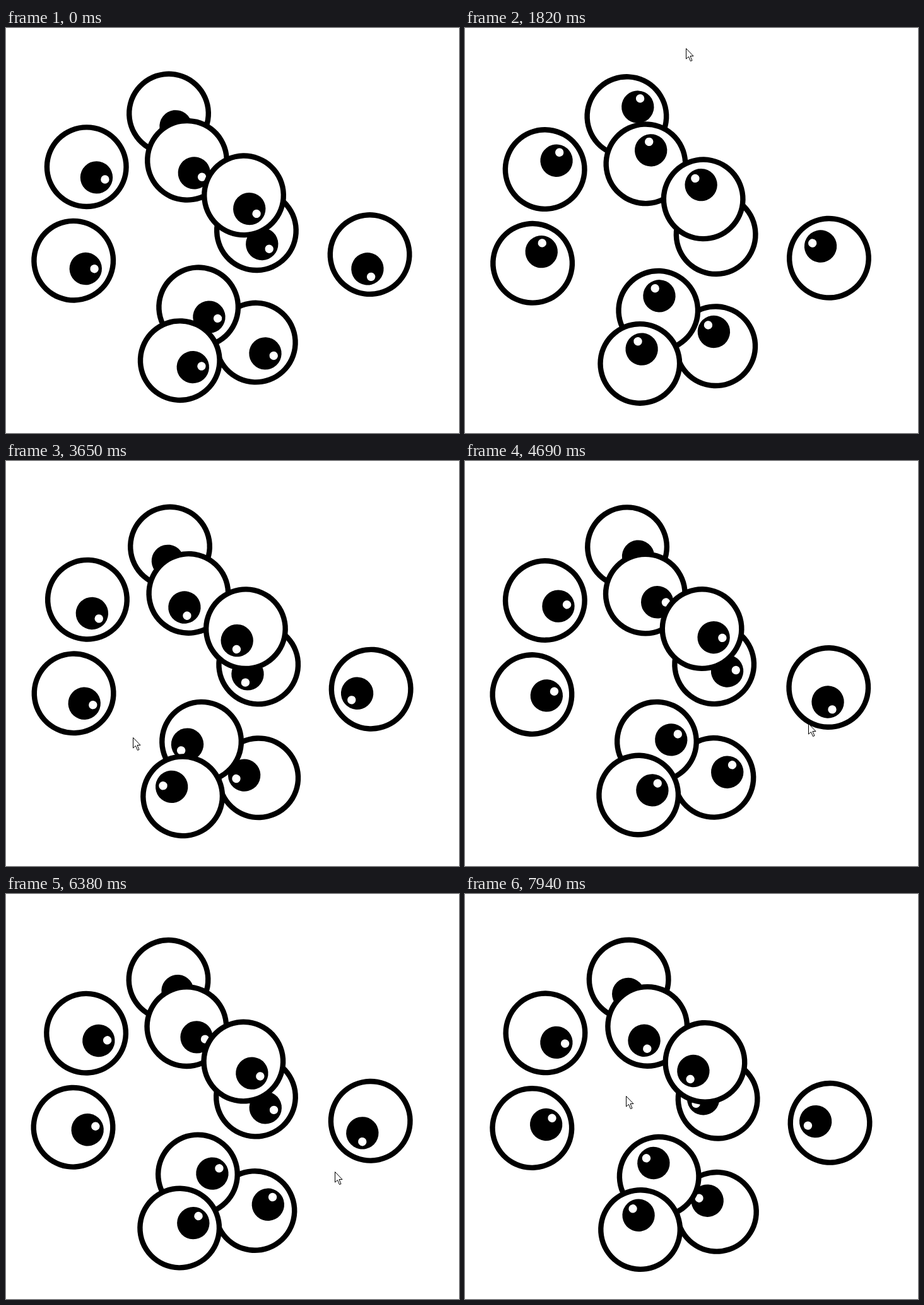
Write an HTML page with a canvas that moves like this. It is 718 px wide and 642 px high and loops after 8000 ms.

```html
<!DOCTYPE html>
<html lang="en">
<head>
<meta charset="utf-8">
<title>Googly eyes</title>
<style>
  html, body { margin: 0; width: 100%; height: 100%; overflow: hidden; background: #fff; }
  canvas { display: block; }
</style>
</head>
<body>
<canvas id="stage" width="718" height="642"></canvas>
<script>
const ctx = document.getElementById('stage').getContext('2d');
const LOOP = 8000, STEP = 130.2;
const GAZE_LEAD = 0.42;    // in steps: the eyes react slightly before the drawn pointer
const HALF_BOX = 58;       // half the side of an eye's rotating box
const TILT = -2 * Math.PI / 180;

// Eye centres, back to front
const eyes = [
  [259, 138.5], [288, 212.7], [397.6, 324.2], [377.7, 268.3], [397.4, 501.2],
  [307, 444.8], [278.2, 529], [109.4, 370.8], [129.4, 222.7], [575.6, 362]
];

// Turning points of the pointer: step, x, y
const path = [
  [0, 500, 685], [4, 652, 300], [7, 595, 132], [14, 350, 32], [20, 167, 56],
  [25, 4, 330], [28, 201, 438], [31, 80, 540], [37, 600, 400], [43, 492, 425],
  [47, 650, 470], [50, 460, 425], [54, 449, 412], [61, 255, 320], [62, 240, 335]
];

function slope(i, axis) {
  const a = path[Math.max(i - 1, 0)], b = path[Math.min(i + 1, path.length - 1)];
  return (b[axis] - a[axis]) / (b[0] - a[0]);
}

// Smooth curve through the turning points
function pointerAt(step) {
  const i = path.findLastIndex(point => point[0] <= step);
  const a = path[i], b = path[i + 1], span = b[0] - a[0], u = (step - a[0]) / span;
  return [1, 2].map(axis =>
    a[axis] + (b[axis] - a[axis]) * u * u * (3 - 2 * u) +
    span * u * (1 - u) * (slope(i, axis) * (1 - u) - slope(i + 1, axis) * u));
}

// An eye aims from the corner of its rotated box, so its aim depends on its own turn.
function aim(x, y, [mx, my]) {
  let angle = Math.atan2(my - y, mx - x);
  for (let i = 0; i < 4; i++) {
    const shift = HALF_BOX * (Math.abs(Math.cos(angle)) + Math.abs(Math.sin(angle)) - 1);
    angle = Math.atan2(my - y + shift, mx - x + shift);
  }
  return angle + TILT;
}

function disc(x, y, radius, color) {
  ctx.beginPath();
  ctx.arc(x, y, radius, 0, 2 * Math.PI);
  ctx.fillStyle = color;
  ctx.fill();
}

function drawEye(x, y, angle) {
  ctx.save();
  ctx.translate(x, y);
  ctx.rotate(angle);
  disc(-3, -0.6, 67, '#000');
  disc(-3, -0.6, 58.6, '#fff');
  disc(20, 0, 25.7, '#000');
  disc(31.7, -7.3, 6.7, '#fff');
  ctx.restore();
}

function drawPointer(x, y) {
  const arrow = new Path2D('M0 0V16.5L4 13L7 20L9.5 19L6.5 12H11.5Z');
  ctx.save();
  ctx.translate(Math.round(x) + 0.5, Math.round(y) + 0.5);
  ctx.fillStyle = '#fff';
  ctx.fill(arrow);
  ctx.strokeStyle = '#000';
  ctx.lineWidth = 1;
  ctx.stroke(arrow);
  ctx.restore();
}

function draw(now) {
  const step = Math.floor((now % LOOP + 5) / STEP);
  const gaze = pointerAt(step + GAZE_LEAD);
  ctx.fillStyle = '#fff';
  ctx.fillRect(0, 0, 718, 642);
  for (const [x, y] of eyes) drawEye(x, y, aim(x, y, gaze));
  drawPointer(...pointerAt(step));
  requestAnimationFrame(draw);
}
requestAnimationFrame(draw);
</script>
</body>
</html>
```
